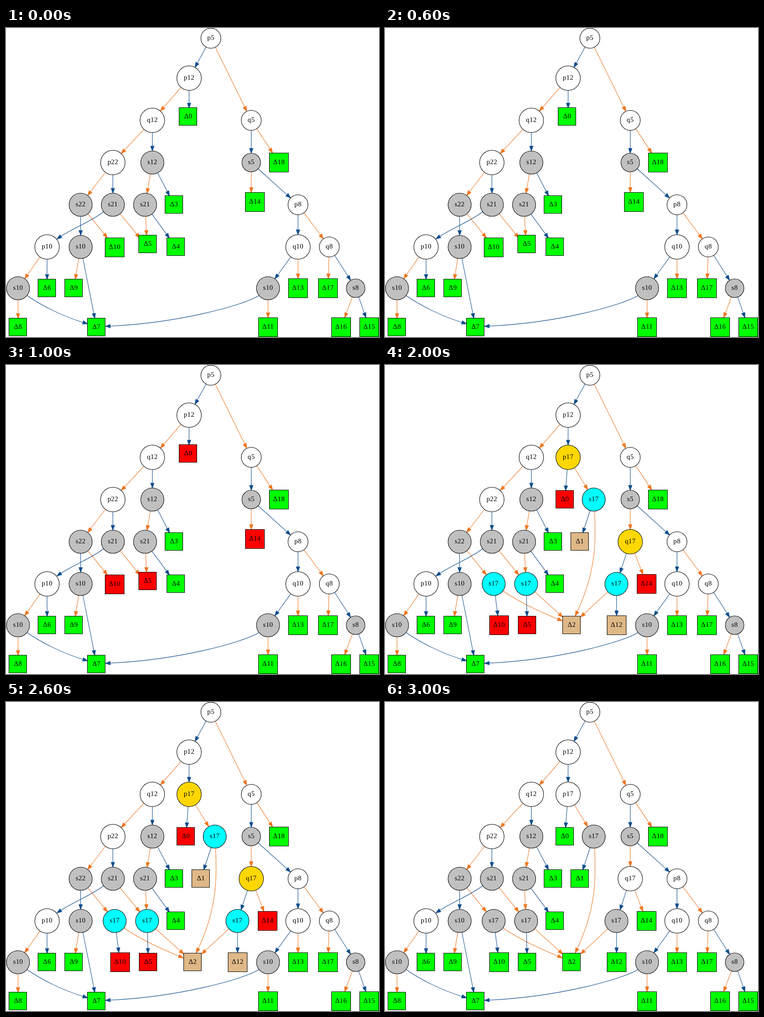
Recreate the animation shown at these times as an HTML page with a canvas. Size 822x681 px, loop 4000 ms.

```html
<!DOCTYPE html>
<html lang="en">
<head>
<meta charset="utf-8">
<title>Decision diagram</title>
<style>
  html, body { margin: 0; width: 100%; height: 100%; overflow: hidden; background: #fff; }
  canvas { display: block; }
</style>
</head>
<body>
<canvas id="stage" width="822" height="681"></canvas>
<script>
const ctx = document.getElementById('stage').getContext('2d');

const BLUE = '#104e8b', ORANGE = '#ee7621';
const GREEN = '#00ff00', RED = '#ff0000', GREY = '#c0c0c0';
const GOLD = '#ffd700', CYAN = '#00ffff', TAN = '#deb887';
const STEP = 1000, STEPS = 4;

// A trailing lowercase letter tells nodes with equal labels apart.
const inner = {
  p5: [451, 22], p12: [403, 110], q12: [322, 203], q5: [540, 203],
  p22: [235, 296], s12: [322, 296], s5: [540, 296],
  s22: [164, 389], s21a: [235, 389], s21b: [306, 389], p8: [643, 389],
  p10: [90, 482], s10b: [164, 482], q10: [643, 482], q8: [712, 482],
  s10a: [26, 573], s10c: [577, 573], s8: [770, 573]
};
const leaves = {
  Δ3: [370, 389], Δ4: [374, 482], Δ6: [90, 573], Δ7: [199, 659],
  Δ8: [26, 659], Δ9: [149, 573], Δ11: [577, 659], Δ13: [643, 573],
  Δ15: [800, 659], Δ16: [738, 659], Δ17: [709, 573], Δ18: [601, 296]
};
const added = {
  p17: [403, 203], q17: [540, 389], s17a: [239, 482], s17b: [310.5, 482],
  s17d: [459.5, 296], s17e: [509.5, 482]
};
const addedLeaves = { Δ1: [429, 389], Δ2: [411, 573], Δ12: [510, 573] };
const splitBefore = { Δ0: [401, 195], Δ5: [312, 476], Δ10: [239, 483], Δ14: [548, 383] };
const splitAfter = { Δ0: [396, 296], Δ5: [313, 573], Δ10: [251, 573], Δ14: [576, 482] };

const place = { ...inner, ...leaves, ...added, ...addedLeaves, ...splitAfter };

// parent: [blue child, orange child]
const links = {
  p5: ['p12', 'q5'], p12: ['p17', 'q12'], q12: ['s12', 'p22'], q5: ['s5', 'Δ18'],
  p22: ['s21a', 's22'], s12: ['Δ3', 's21b'], s5: ['p8', 'q17'],
  s22: ['s10b', 's17a'], s21a: ['p10', 's17b'], s21b: ['Δ4', 's17b'],
  p8: ['q10', 'q8'], p10: ['Δ6', 's10a'], s10b: ['Δ7', 'Δ9'],
  q10: ['s10c', 'Δ13'], q8: ['s8', 'Δ17'], s10a: ['Δ7', 'Δ8'],
  s10c: ['Δ7', 'Δ11'], s8: ['Δ15', 'Δ16'],
  p17: ['Δ0', 's17d'], q17: ['s17e', 'Δ14'], s17a: ['Δ10', 'Δ2'],
  s17b: ['Δ5', 'Δ2'], s17d: ['Δ1', 'Δ2'], s17e: ['Δ12', 'Δ2']
};

// start, two control points, arrow base, arrow tip
const curves = {
  's21a>p10': [215, 405, 190, 425, 150, 440, 121, 459, 112, 465],
  's10a>Δ7': [47, 590, 80, 613, 125, 635, 170, 649, 180, 652],
  's10c>Δ7': [557, 590, 520, 612, 380, 650, 230, 657, 219, 657.5],
  's17d>Δ2': [462, 322, 464, 385, 467, 450, 424, 543, 419, 553],
  's17a>Δ2': [260, 498, 300, 525, 340, 543, 381, 560, 391, 564]
};

const labelOf = id => id.replace(/[a-e]$/, '');
const isLeaf = id => id[0] === 'Δ';

function sizeOf(id) {
  const long = labelOf(id).length > 2;
  if (isLeaf(id)) return long ? 21 : 19.5;
  if (id[0] === 's') return long ? 25.5 : 20.5;
  return long ? 27 : 22;
}

// Distance from a node's centre to its border along a unit vector.
function reach(id, ux, uy) {
  const size = sizeOf(id);
  return isLeaf(id) ? size / Math.max(Math.abs(ux), Math.abs(uy)) : size;
}

function arrowHead(bx, by, tx, ty) {
  const len = Math.hypot(tx - bx, ty - by);
  const ux = (tx - bx) / len, uy = (ty - by) / len;
  const x = tx - ux * 10.8, y = ty - uy * 10.8;
  ctx.beginPath();
  ctx.moveTo(tx, ty);
  ctx.lineTo(x - uy * 3.8, y + ux * 3.8);
  ctx.lineTo(x + uy * 3.8, y - ux * 3.8);
  ctx.closePath();
  ctx.fill();
  ctx.stroke();
}

function drawEdge(from, to, color) {
  ctx.strokeStyle = ctx.fillStyle = color;
  ctx.beginPath();
  const curve = curves[from + '>' + to];
  if (curve) {
    const [x, y, ax, ay, cx, cy, bx, by, tx, ty] = curve;
    ctx.moveTo(x, y);
    ctx.bezierCurveTo(ax, ay, cx, cy, bx, by);
    ctx.stroke();
    arrowHead(bx, by, tx, ty);
    return;
  }
  const [x0, y0] = place[from].map(v => v + 0.5);
  const [x1, y1] = place[to].map(v => v + 0.5);
  const len = Math.hypot(x1 - x0, y1 - y0);
  const ux = (x1 - x0) / len, uy = (y1 - y0) / len;
  const a = reach(from, ux, uy), b = len - reach(to, ux, uy);
  const sx = x0 + ux * a, sy = y0 + uy * a;
  const tx = x0 + ux * b, ty = y0 + uy * b;
  ctx.moveTo(sx, sy);
  ctx.lineTo(tx - ux * 10, ty - uy * 10);
  ctx.stroke();
  arrowHead(sx, sy, tx, ty);
}

function drawNode(id, [x, y], fill) {
  const size = sizeOf(id);
  ctx.beginPath();
  if (isLeaf(id)) {
    ctx.rect(Math.floor(x - size) + 0.5, Math.floor(y - size) + 0.5, size * 2, size * 2);
  } else {
    ctx.arc(x + 0.5, y + 0.5, size, 0, Math.PI * 2);
  }
  ctx.fillStyle = fill;
  ctx.fill();
  ctx.strokeStyle = '#000';
  ctx.stroke();
  ctx.fillStyle = '#000';
  ctx.fillText(labelOf(id), x + 0.5, y + 4);
}

function drawNodes(group, fill) {
  for (const id in group) drawNode(id, group[id], typeof fill === 'function' ? fill(id) : fill);
}

const plain = id => id[0] === 's' ? GREY : '#fff';
const fresh = id => id[0] === 's' ? CYAN : GOLD;

function drawStep(step) {
  const grown = step >= 2;
  ctx.fillStyle = '#fff';
  ctx.fillRect(0, 0, 822, 681);
  ctx.lineWidth = 1.08;
  ctx.font = '15px "Liberation Serif", "Times New Roman", serif';
  ctx.letterSpacing = '0.4px';
  ctx.textAlign = 'center';

  for (const id in links) {
    if (id in added && !grown) continue;
    drawEdge(id, links[id][0], BLUE);
    drawEdge(id, links[id][1], ORANGE);
  }

  drawNodes(inner, plain);
  drawNodes(leaves, GREEN);
  if (grown) {
    drawNodes(added, step === 2 ? fresh : plain);
    drawNodes(addedLeaves, step === 2 ? TAN : GREEN);
  }
  drawNodes(grown ? splitAfter : splitBefore, step === 1 || step === 2 ? RED : GREEN);
}

const start = performance.now();
let shown = -1;

function tick() {
  const step = Math.floor((performance.now() - start) / STEP) % STEPS;
  if (step !== shown) drawStep(shown = step);
  requestAnimationFrame(tick);
}
tick();
</script>
</body>
</html>
```
